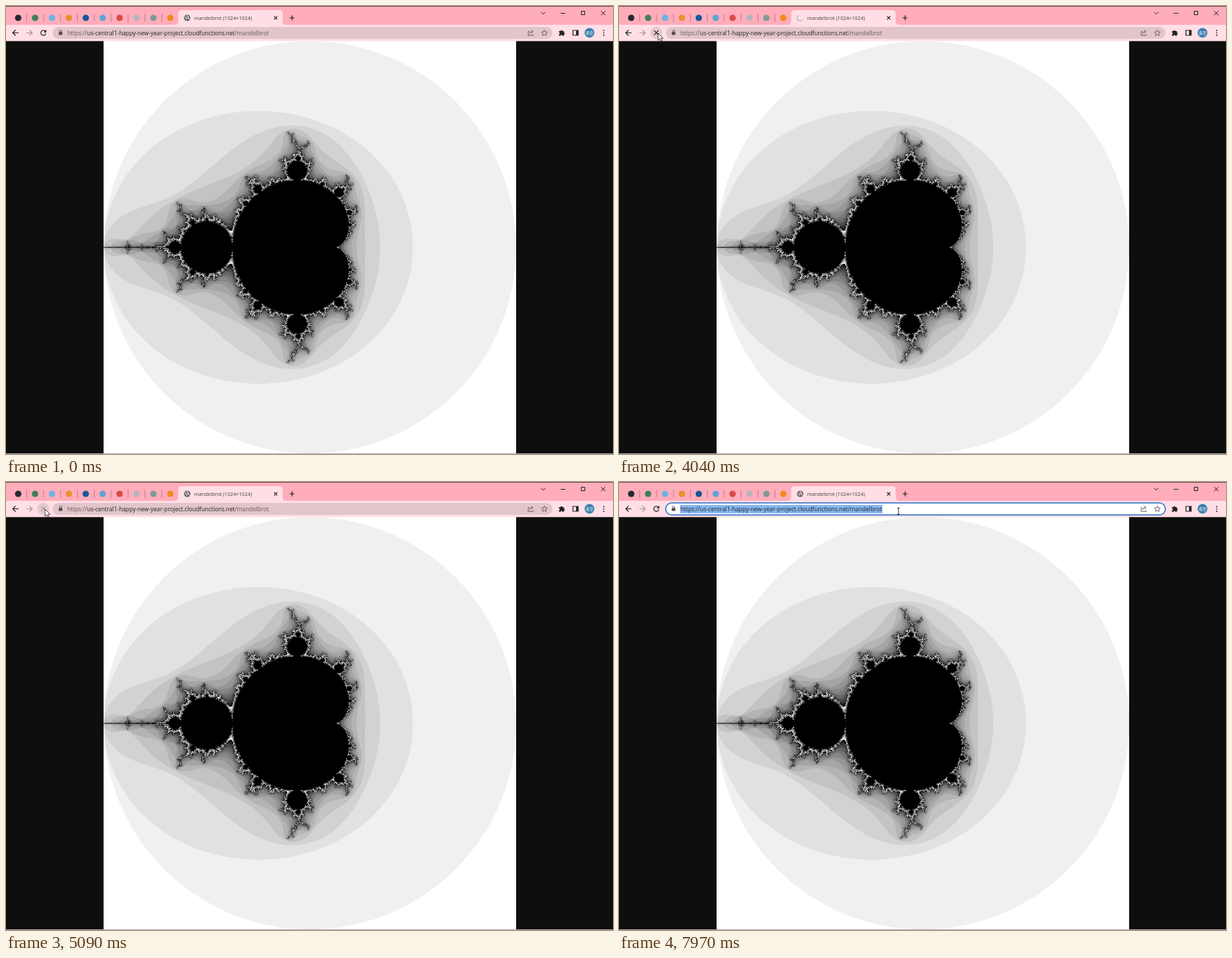
Animation, 871 px wide and 643 px high, one loop 8000 ms. Source, as an HTML page with a canvas:

```html
<!DOCTYPE html>
<html lang="en">
<head>
<meta charset="utf-8">
<title>mandelbrot</title>
<style>
  html, body { margin: 0; width: 100%; height: 100%; overflow: hidden; background: #0e0e0e; }
  canvas, svg { position: absolute; left: 0; top: 0; display: block; }
  text { font-family: "Open Sans", "Noto Sans", sans-serif; white-space: pre; }
  .cjk { font-family: "Noto Sans CJK JP", "Noto Sans CJK", sans-serif; }
  .line { fill: none; stroke: #202124; stroke-width: 1.2; }
</style>
</head>
<body>
<canvas id="fractal" width="871" height="643"></canvas>
<svg width="871" height="643" viewBox="0 0 871 643">
  <rect id="pending" fill="#404040"/>
  <rect y="642" width="871" height="1" fill="#a9adb8"/>

  <!-- tab strip -->
  <rect width="871" height="28" fill="#ffacbb"/>
  <rect width="871" height="1" fill="#6b4a52"/>
  <g id="tabs"></g>
  <path d="M242 27q5 0 5-5V11q0-5 5-5H392q5 0 5 5V22q0 5 5 5Z" fill="#ffdfe5"/>
  <g id="globe">
    <circle cx="260" cy="17" r="4.6" fill="#5f6368"/>
    <path d="M256.6 15.3l2.4 2.2v2.6M260 13v1.8l2 1 -1.2 1.6 2.8 1.4" fill="none" stroke="#ffdfe5" stroke-width="1.1"/>
  </g>
  <path id="spinner" d="M260 12.6A4.4 4.4 0 0 0 260 21.4" fill="none" stroke-width="1.1" stroke-linecap="round"/>
  <text x="270" y="19.7" font-size="7.22" fill="#3c4043">mandelbrot (1024×1024)</text>
  <path class="line" d="M384.7 14.7l4.6 4.6m0-4.6l-4.6 4.6"/>
  <path class="line" id="plus" d="M407 17h7m-3.5-3.5v7"/>
  <path class="line" id="controls" style="stroke-width:1" d="M768 8.7l3 3 3-3M796 10.5h6.5M825.5 7.5h5v5h-5ZM854 7.3l6 6m0-6l-6 6"/>

  <!-- toolbar -->
  <rect y="27" width="871" height="23.4" fill="#ffdfe5"/>
  <path class="line" d="M18 38.5H9.7m4-4l-4 4 4 4"/>
  <path class="line" style="stroke:#a8949a" d="M29.3 38.5h8.3m-4-4l4 4-4 4"/>
  <circle id="hover" cx="53.5" cy="38.5" r="8.7" fill="#e6c9cf"/>
  <g id="reload">
    <path class="line" d="M56.6 36.3A3.7 3.7 0 1 0 57.2 39.4"/>
    <path d="M57.9 34v3.9H54Z" fill="#202124"/>
  </g>
  <path class="line" id="stop" d="M50.3 35.2l6.5 6.5m0-6.5l-6.5 6.5"/>
  <rect id="omnibox" x="67" y="30" width="717" height="17.2" rx="8.6" stroke-width="1.5"/>
  <rect id="selection" x="88" y="33" width="290" height="12" fill="#86b7f2"/>
  <rect x="75.7" y="37.2" width="5.2" height="4.4" rx=".6" fill="#54494c"/>
  <path d="M76.8 37.4v-1.3a1.5 1.5 0 0 1 3 0v1.3" fill="none" stroke="#54494c" stroke-width=".9"/>
  <text x="88" y="41.5" font-size="8.32" fill="#202124"><tspan class="dim">https://</tspan>us-central1-happy-new-year-project.cloudfunctions.net<tspan class="dim">/mandelbrot</tspan></text>
  <g fill="none" stroke="#5f5357" stroke-width=".9">
    <path d="M751.3 36.7h-2v5.6h7v-2M751.4 40.2q.4-3.5 3.8-3.5M753.7 34.6l2.5 2.1-2.5 2.1"/>
    <path d="M772.5 34.3l1.25 2.75 3 .3-2.25 2 .65 2.95-2.65-1.5-2.65 1.5.65-2.95-2.25-2 3-.3Z"/>
  </g>
  <path d="M793.5 36h2.2a1.3 1.3 0 0 1 2.6 0h2.2v2.2a1.3 1.3 0 0 1 0 2.6v2h-2.3a1.2 1.2 0 0 0-2.4 0h-2.3v-2.3a1.2 1.2 0 0 0 0-2.4Z" fill="#202124"/>
  <path class="line" d="M813.5 35h7.5v7h-7.5Z"/>
  <path d="M818 35h3v7h-3Z" fill="#202124"/>
  <circle cx="837.3" cy="38.4" r="7" fill="#3b7fae"/>
  <text class="cjk" x="837.3" y="40.6" font-size="5.6" fill="#fff" text-anchor="middle">青空</text>
  <g fill="#202124"><circle cx="857.7" cy="35.2" r=".95"/><circle cx="857.7" cy="38.6" r=".95"/><circle cx="857.7" cy="42" r=".95"/></g>

  <g id="tooltip">
    <rect x="62.5" y="49.5" width="110" height="15" fill="#f9f9f9" stroke="#8a8a8a" stroke-width=".8"/>
    <text class="cjk" x="66" y="59.7" font-size="7.4" fill="#444">このページを再読み込みします</text>
  </g>

  <g id="pointer">
    <path id="arrow" d="M0 0V10.2L2.4 8 3.9 11.6 5.7 10.8 4.2 7.4H7.4Z" fill="#fff" stroke="#000" stroke-width=".7"/>
    <g id="zoom" fill="none" stroke-linecap="round">
      <path d="M2 2L4.7 4.7" stroke="#fff" stroke-width="3"/>
      <circle cx="-1" cy="-1" r="3.5" fill="#fff" stroke="#fff" stroke-width="2.4"/>
      <path d="M1.6 1.6L4.5 4.5" stroke="#000" stroke-width="1.7"/>
      <circle cx="-1" cy="-1" r="3.5" stroke="#000"/>
      <path d="M-2.8-1H.8M-1-2.8V.8" stroke="#000"/>
    </g>
    <path id="beam" d="M-1.8-4.5H1.8M0-4.5V4.5M-1.8 4.5H1.8" fill="none" stroke="#000" stroke-width=".8"/>
  </g>
</svg>
<script>
const DURATION = 8000;
const LEFT = 139.9, TOP = 50.2, SIZE = 591.6, SAMPLES = 1024;
const CLICK = 3130, COMMIT = 5020, LOADED = 5090, FOCUS = 7760;
const $ = id => document.getElementById(id);
const show = (id, on) => $(id).style.display = on ? '' : 'none';
const within = (t, from, to) => t >= from && t < to;
const set = (id, attributes) => {
  for (const name in attributes) $(id).setAttribute(name, attributes[name]);
};

// Gray level from the escape count, wrapping like an unsigned byte.
function shade(x, y) {
  const q = (x - .25) ** 2 + y * y;
  if (q * (q + x - .25) < y * y / 4 || (x + 1) ** 2 + y * y < .0625) return 0;
  let a = 0, b = 0;
  for (let n = 0; n < 200; n++) {
    const next = a * a - b * b + x;
    b = 2 * a * b + y;
    a = next;
    if (a * a + b * b > 4) return (255 - 15 * n) & 255;
  }
  return 0;
}

function drawFractal() {
  const full = document.createElement('canvas');
  full.width = full.height = SAMPLES;
  const ctx = full.getContext('2d');
  const image = ctx.createImageData(SAMPLES, SAMPLES);
  const at = p => p * 4 / SAMPLES - 2;
  for (let y = 0, i = 0; y < SAMPLES; y++) {
    for (let x = 0; x < SAMPLES; x++, i += 4) {
      image.data[i] = image.data[i + 1] = image.data[i + 2] = shade(at(x), at(y));
      image.data[i + 3] = 255;
    }
  }
  ctx.putImageData(image, 0, 0);
  $('fractal').getContext('2d').drawImage(full, LEFT, TOP, SIZE, SIZE);
}

function drawTabs() {
  const colors = ['#24292f', '#3f7f55', '#6cb2e4', '#e8912d', '#17599c',
                  '#5da5d8', '#d94a42', '#b9b4ba', '#7d9a98', '#f08a1c'];
  $('tabs').innerHTML = colors.map((color, i) => {
    const x = 17.5 + i * 24.25;
    const divider = i < 9 ? `<path d="M${x + 12.2} 11.5v11" stroke="#a9737e" stroke-width=".8"/>` : '';
    return `<circle cx="${x}" cy="17" r="4.6" fill="${color}"/>${divider}`;
  }).join('');
}

// time, x, y
const path = [
  [970, 826, 354], [1740, 271, 183], [2440, 61, 51], [2580, 51, 38], [2730, 49, 43],
  [3060, 56, 39], [6440, 56, 39], [7130, 287, 62], [7270, 341, 62], [7900, 401, 42], [DURATION, 401, 42]
];

const slope = (i, axis) => (path[i + 1][axis] - path[i][axis]) / (path[i + 1][0] - path[i][0]);

// Velocity at a point, zero where the direction turns, so the curve never overshoots.
function velocity(i, axis) {
  if (i === 0) return slope(0, axis);
  if (i === path.length - 1) return 0;
  const before = slope(i - 1, axis), after = slope(i, axis);
  return before * after > 0 ? 2 * before * after / (before + after) : 0;
}

function pointerAt(t) {
  const end = path.findIndex(p => p[0] > t), i = Math.max(0, end - 1);
  const span = path[i + 1][0] - path[i][0];
  const k = Math.max(0, (t - path[i][0]) / span), m = 1 - k;
  return [1, 2].map(axis =>
    m * m * (1 + 2 * k) * path[i][axis] + k * k * (1 + 2 * m) * path[i + 1][axis] +
    k * m * span * (m * velocity(i, axis) - k * velocity(i + 1, axis)));
}

function render(t) {
  const [x, y] = pointerAt(t);
  const inBar = y < TOP && x > 67 && x < 784;
  const inImage = y >= TOP && x > LEFT && x < LEFT + SIZE;
  show('pointer', t >= path[0][0]);
  set('pointer', { transform: `translate(${x} ${y})` });
  show('beam', inBar);
  show('zoom', inImage);
  show('arrow', !inBar && !inImage);

  const inactive = within(t, 170, CLICK);
  $('controls').style.stroke = inactive ? '#a9757f' : '#202124';
  $('plus').style.stroke = inactive ? '#2d2628' : '#202124';

  const spinning = within(t, CLICK, LOADED), receiving = within(t, COMMIT, LOADED);
  show('globe', !spinning);
  show('spinner', spinning);
  const angle = receiving ? (t - COMMIT) * .36 + 30 : (4040 - t) * .2 - 45;
  set('spinner', { stroke: receiving ? '#8fb0e8' : '#a4a3bd', transform: `rotate(${angle} 260 17)` });

  // The button waits for a possible double click before it turns into stop.
  const stopping = within(t, CLICK + 500, 5240);
  show('reload', !stopping);
  show('stop', stopping);
  $('stop').style.stroke = t >= LOADED ? '#a8949a' : '#202124';
  show('hover', within(t, 2580, 6510));
  show('tooltip', within(t, 5910, 6510));

  show('pending', receiving);
  set('pending', { x: LEFT, y: 413.5, width: SIZE, height: TOP + SIZE - 413.5 });

  const focused = t >= FOCUS;
  show('selection', focused);
  set('omnibox', { fill: focused ? '#fff' : '#e2c5cb', stroke: focused ? '#2b6cc8' : 'none' });
  for (const part of document.querySelectorAll('.dim')) part.style.fill = focused ? '#202124' : '#66585c';
}

drawFractal();
drawTabs();
const start = performance.now();
function tick() {
  render((performance.now() - start) % DURATION);
  requestAnimationFrame(tick);
}
tick();
</script>
</body>
</html>
```
